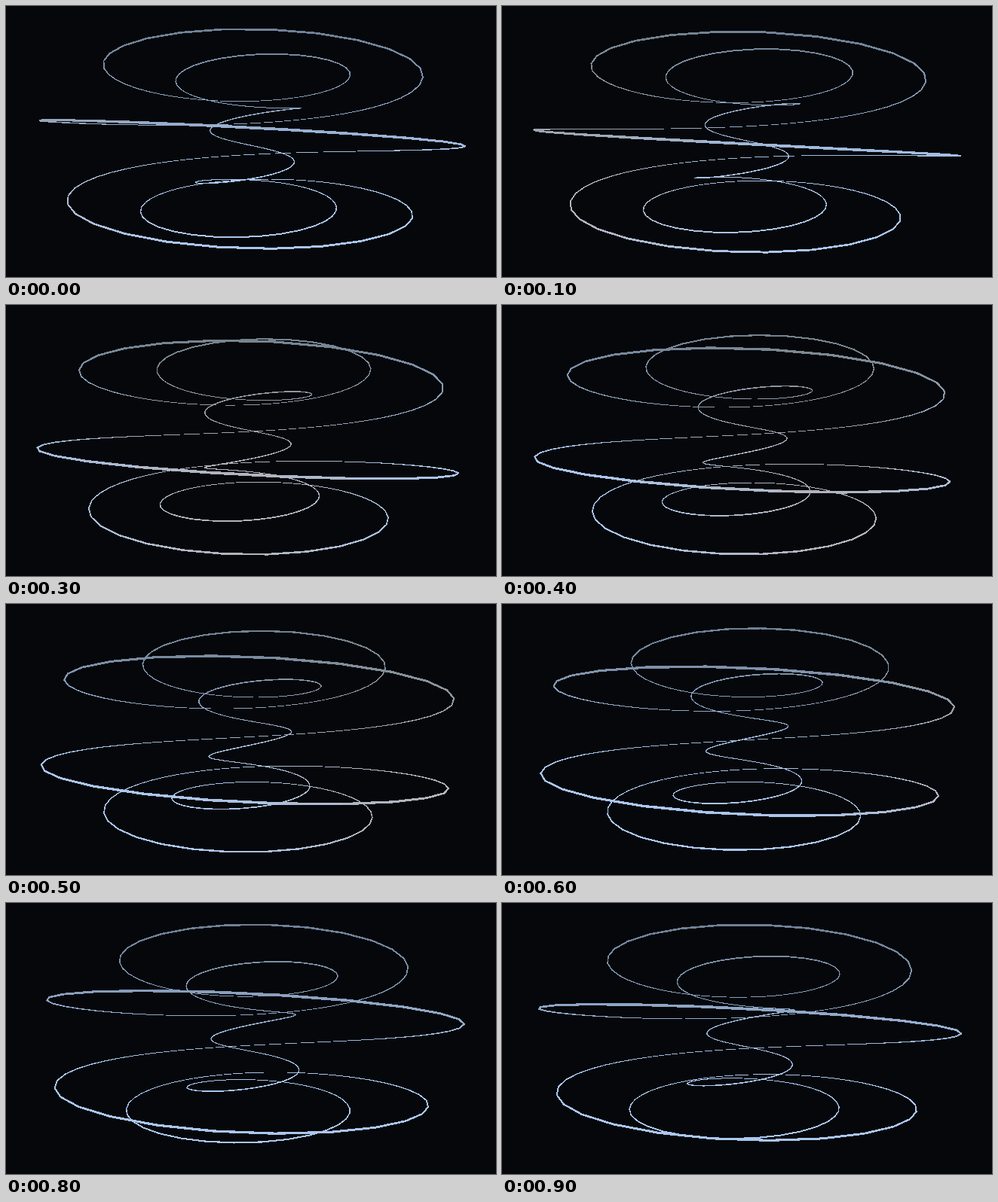
An HTML page with a canvas for the animation above (1 s loop, 650 by 360 pixels).

```html
<!DOCTYPE html>
<html lang="en">
<head>
<meta charset="utf-8">
<title>Turning coil</title>
<style>
  html, body { margin: 0; width: 100%; height: 100%; overflow: hidden; background: #05070b; }
  canvas { display: block; }
</style>
</head>
<body>
<canvas id="stage" width="650" height="360"></canvas>
<script>
const ctx = document.getElementById('stage').getContext('2d');
const W = 650, H = 360, CX = 325, CY = 180;
const TAU = Math.PI * 2;
const EYE = (H / 2) / Math.tan(Math.PI / 6); // 60 degree field of view
const RING = 131.2, TUBE = 78.95, WEIGHT = 1.25;
const TURNS = 7, POINTS = 280;
const LOOP = 1000, STEP = 100;

const TOP = [112, 129, 151], BOTTOM = [170, 198, 238];
const TOP_GREY = [118, 131, 141], BOTTOM_GREY = [176, 180, 190];

const mix = (a, b, k) => a.map((v, i) => v + (b[i] - v) * k);
const clamp = v => Math.max(0, Math.min(1, v));

// Point i of a coil wound round a torus, in perspective
function project(i, spin) {
  const u = i / POINTS * TAU;
  const a = TURNS * u - spin;
  const radius = RING + TUBE * Math.cos(u);
  const scale = EYE / (EYE - radius * Math.cos(a));
  return {
    x: CX + radius * Math.sin(a) * scale,
    y: CY + TUBE * Math.sin(u) * scale,
    half: scale * WEIGHT / 2
  };
}

// Darker towards the top, with a grey band sweeping to the right
function shade(x, y, ms) {
  const band = 180 + (ms - 200) * 1.2;
  const grey = Math.exp(-(((x - band) / 190) ** 2));
  const low = clamp((y - 45) / 175);
  const rgb = mix(mix(TOP, BOTTOM, low), mix(TOP_GREY, BOTTOM_GREY, low), grey);
  return `rgb(${rgb.map(Math.round).join(',')})`;
}

// Tapered line without antialiasing: fills pixels whose centre it covers
function hardLine(p, q) {
  const dx = q.x - p.x, dy = q.y - p.y, len2 = dx * dx + dy * dy;
  const pad = Math.max(p.half, q.half);
  const x1 = Math.max(p.x, q.x) + pad, y1 = Math.max(p.y, q.y) + pad;
  for (let y = Math.floor(Math.min(p.y, q.y) - pad); y < y1; y++) {
    for (let x = Math.floor(Math.min(p.x, q.x) - pad); x < x1; x++) {
      const px = x + 0.5 - p.x, py = y + 0.5 - p.y;
      const k = clamp((px * dx + py * dy) / len2);
      const half = p.half + (q.half - p.half) * k;
      if (Math.hypot(px - dx * k, py - dy * k) <= half) ctx.fillRect(x, y, 1, 1);
    }
  }
}

function draw(ms) {
  const spin = TAU * (ms - 100) / LOOP + 0.095;
  ctx.fillStyle = '#05070b';
  ctx.fillRect(0, 0, W, H);
  let p = project(0, spin);
  for (let i = 1; i <= POINTS; i++) {
    const q = project(i, spin);
    ctx.fillStyle = shade((p.x + q.x) / 2, (p.y + q.y) / 2, ms);
    hardLine(p, q);
    p = q;
  }
}

let shown = -1;
function tick() {
  const ms = Math.floor(performance.now() % LOOP / STEP) * STEP;
  if (ms !== shown) draw(shown = ms);
  requestAnimationFrame(tick);
}
tick();
</script>
</body>
</html>
```
